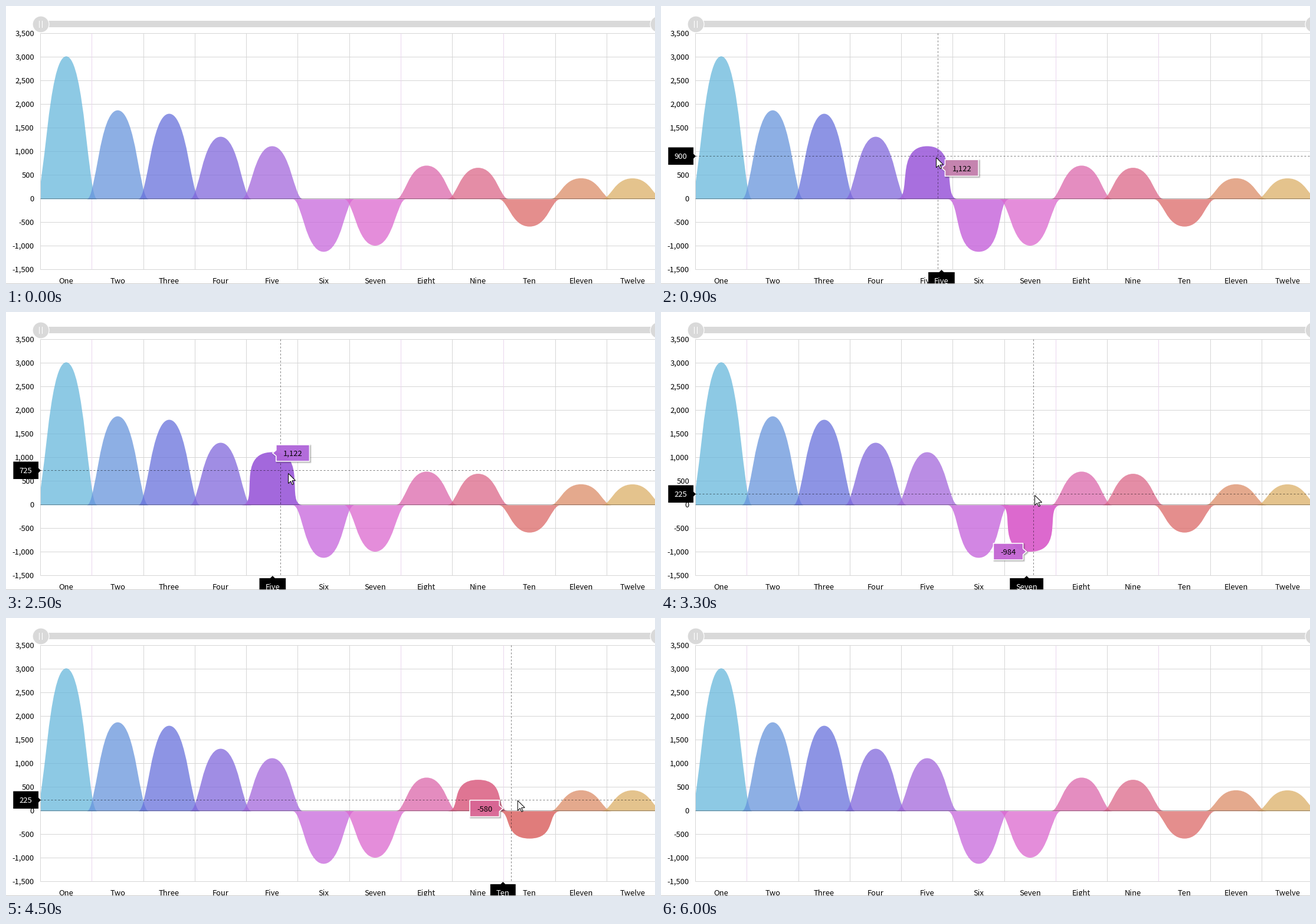
A matplotlib script that plays this animation: 1100 by 471 pixels, repeating every 6.2 s.

```python
import math

import matplotlib.pyplot as plt
import numpy as np
from matplotlib.animation import FuncAnimation
from matplotlib.colors import to_rgb
from matplotlib.patches import Circle, PathPatch, Polygon, Rectangle
from matplotlib.path import Path

W, H, DPI = 1100, 471, 64
PX = 72 / DPI  # points per pixel
STEP, FRAMES = 100, 62
LEFT, TOP, BOTTOM, BASE = 58.5, 46.5, 446.5, 326.5
CELL, UNIT = 87.25, 0.08
HALF = CELL * 0.6
GRID = "#d6d6d6"

NAMES = ["One", "Two", "Three", "Four", "Five", "Six", "Seven", "Eight",
         "Nine", "Ten", "Eleven", "Twelve"]
VALUES = [3025, 1882, 1809, 1322, 1122, -1114, -984, 711, 665, -580, 443, 441]
COLORS = ["#67b7dc", "#6794dc", "#6771dc", "#8067dc", "#a367dc", "#c767dc",
          "#dc67ce", "#dc67ab", "#dc6788", "#dc6967", "#dc8c67", "#dcaf67"]

# Turning points of the pointer: time, x, y
TRAIL = np.array([
    (100, 1078, 97), (300, 530, 245), (800, 469.5, 254.5), (1100, 459, 260),
    (1400, 546, 290), (2350, 459, 266.25), (2500, 478, 273),
    (3000, 628, 305.5), (3300, 633, 310), (3900, 761.5, 305.5),
    (4000, 815, 308), (5000, 918.5, 309.5), (5100, 933, 281),
    (5400, 1085, 34)])
LAG = 100               # the crosshair trails the pointer
MOVE, FADE, TINT = 500, 700, 700

plt.rcParams["font.family"] = "Noto Sans CJK JP"
fig = plt.figure(figsize=(W / DPI, H / DPI), dpi=DPI, facecolor="white")
ax = fig.add_axes([0, 0, 1, 1])
ax.set_xlim(0, W)
ax.set_ylim(H, 0)
ax.axis("off")


def center(i):
    return LEFT + CELL * (i + 0.5)


def level(value):
    return BASE - value * UNIT


def crisp(v):
    return math.floor(v) + 0.5


def line(x, y, z=1, width=1, **kw):
    return ax.plot(x, y, lw=width * PX, zorder=z, solid_capstyle="butt",
                   snap=False, **kw)[0]


def label(x, y, text="", color="black", ha="center", z=1):
    return ax.text(x, y + 5, text, color=color, ha=ha, va="baseline",
                   size=13 * PX, zorder=z, clip_on=True)


def text_width(item):
    return item.get_window_extent().width


def shape(z, **kw):
    return ax.add_patch(Polygon([(0, 0), (1, 0), (1, 1)], zorder=z, **kw))


def bell(i, hover):
    """Curved column; hovering widens its shoulders."""
    x, base = center(i), BASE + 0.8
    top = base - VALUES[i] * UNIT
    pull = HALF * (0.3 + 0.3 * hover)
    points = [(x - HALF, base), (x - HALF + pull, base), (x - 2 * pull, top),
              (x, top), (x + 2 * pull, top), (x + HALF - pull, base),
              (x + HALF, base)]
    return Path(points, [Path.MOVETO] + [Path.CURVE4] * 6)


def pointer_at(t):
    return [np.interp(t, TRAIL[:, 0], TRAIL[:, k]) for k in (1, 2)]


def inside(t):
    return t > 0 and pointer_at(t)[1] > TOP


def cell_at(t):
    """Category under the crosshair, or None while it is hidden."""
    return int((pointer_at(t - LAG)[0] - LEFT) / CELL) if inside(t) else None


def cubic_out(u):
    return 1 - (1 - u) ** 3


def linear(u):
    return u


def follow(t, stops, ease=cubic_out):
    """Ease towards each (start, goal, span), from wherever we are."""
    value = stops[0][1]
    ends = [s[0] for s in stops[1:]] + [math.inf]
    for (start, goal, span), end in zip(stops, ends):
        if t < start:
            break
        u = min((min(t, end) - start) / span, 1)
        value = value + (goal - value) * ease(u)
    return value


def changes(pick):
    """Times at which pick(t) takes a new value."""
    found = [(0, pick(0))]
    for t in range(STEP, STEP * FRAMES, STEP):
        if pick(t) != found[-1][1]:
            found.append((t, pick(t)))
    return found


TARGETS = [(t, k) for t, k in changes(cell_at) if k is not None]
TIP_STOPS = [(t, np.array([center(k), level(VALUES[k])]), MOVE)
             for t, k in TARGETS]
TINT_STOPS = [(t, np.array(to_rgb(COLORS[k])), TINT) for t, k in TARGETS]
HOVER_STOPS = [[(t, float(on), MOVE if on else FADE)
                for t, on in changes(lambda t: cell_at(t) == i)]
               for i in range(len(NAMES))]

# Scrollbar
ax.add_patch(Rectangle((59, 25), W, 11, color="#d9d9d9", lw=0))
for x in (59, 1106):
    ax.add_patch(Circle((x, 31), 14, fc="#d9d9d9", ec="white", lw=1.2 * PX,
                        zorder=2))
    for dx in (-3, 2):
        line([x + dx + 0.5] * 2, [25, 37], 3, color="white")

# Grid and axis labels
for value in range(-1500, 3501, 500):
    y = crisp(level(value) + 0.1)
    if value:
        line([LEFT, W], [y, y], color=GRID)
    label(48, y - 0.5, f"{value:,}", ha="right")
for i, name in enumerate(NAMES):
    x = crisp(LEFT + CELL * i)
    line([x, x], [TOP, BOTTOM], color="#ead6ee" if i in (1, 7, 9) else GRID)
    label(center(i), 465, name)
line([LEFT, W], [BASE, BASE], 3, color="black", alpha=0.35)
line([0, W], [470.5, 470.5], 20, color="#cccccc")

# Columns
plot_area = Rectangle((LEFT, 0), W, H, transform=ax.transData)
columns = []
for i, color in enumerate(COLORS):
    patch = ax.add_patch(PathPatch(bell(i, 0), fc=color, lw=0, zorder=2))
    patch.set_clip_path(plot_area)
    columns.append(patch)

# Cursor parts
DASH = dict(color="black", alpha=0.5, linestyle=(0, (3, 3)))
v_line = line([0, 0], [TOP, BOTTOM], 4, **DASH)
h_line = line([LEFT, W], [0, 0], 4, **DASH)
value_box = shape(5, fc="black", lw=0)
value_text = label(0, 0, color="white", z=6)
name_box = shape(5, fc="black", lw=0)
name_text = label(0, 465, color="white", z=6)
shadows = [shape(7, fc="black", ec="black", alpha=0.1, lw=w * PX,
                 joinstyle="round") for w in (2, 4)]
tip_box = shape(8, ec="white", lw=1.6 * PX, joinstyle="round")
tip_text = label(0, 0, z=9)
pointer = shape(12, fc="white", ec="black", lw=PX)
ARROW = np.array([(0, 0), (0, 17), (4, 13.2), (6.7, 19), (9, 18),
                  (6.4, 12.3), (12, 12)])
overlay = [v_line, h_line, value_box, value_text, name_box, name_text,
           *shadows, tip_box, tip_text, pointer]


def place_value_tag(y):
    value = round((BASE - y) / UNIT / 12.5) * 12.5
    value_text.set_text(f"{math.floor(value + 0.5):,}")
    right = 55
    left = right - text_width(value_text) - 21
    value_box.set_xy([(left, y - 15), (right, y - 15), (right, y - 4),
                      (right + 4, y), (right, y + 4), (right, y + 14.5),
                      (left, y + 14.5)])
    value_text.set_position(((left + right) / 2, y + 4.5))


def place_name_tag(x, name):
    name_text.set_text(name)
    name_text.set_x(x)
    half = text_width(name_text) / 2 + 10
    name_box.set_xy([(x - half, H), (x - half, 451), (x - 4, 451), (x, 447),
                     (x + 4, 451), (x + half, 451), (x + half, H)])


def place_tooltip(x, y, value, tint):
    tip_text.set_text(f"{value:,}")
    width = text_width(tip_text) + 24
    side = 1 if x < W / 2 + 30 else -1
    near, far = x + side * 6, x + side * (6 + width)
    y += 0.8
    outline = np.array([(x, y), (near, y - 5), (near, y - 14), (far, y - 14),
                        (far, y + 14), (near, y + 14), (near, y + 5)])
    tip_box.set_xy(outline)
    tip_box.set_facecolor((*tint, 0.95))
    for shadow in shadows:
        shadow.set_xy(outline + 1.5)
    tip_text.set_position(((near + far) / 2, y + 5))


def update(n):
    t = n * STEP
    for i, patch in enumerate(columns):
        hover = follow(t, HOVER_STOPS[i])
        patch.set_path(bell(i, hover))
        patch.set_alpha(0.75 + 0.25 * hover)

    visible = inside(t)
    for item in overlay:
        item.set_visible(visible)
    if not visible:
        return overlay

    lx, ly = map(crisp, pointer_at(t - LAG))
    v_line.set_xdata([lx, lx])
    h_line.set_ydata([ly, ly])
    pointer.set_xy(ARROW + np.array(pointer_at(t)) + 0.5)
    place_value_tag(ly)

    current = cell_at(t)
    previous = cell_at(t - STEP)
    named = current if previous is None else previous
    x, y = follow(t, TIP_STOPS)
    place_name_tag(x, NAMES[named])
    place_tooltip(x, y, VALUES[current], follow(t, TINT_STOPS, linear))
    return overlay


anim = FuncAnimation(fig, update, frames=FRAMES, interval=STEP, repeat=True,
                     repeat_delay=0, blit=False)
plt.show()
```
